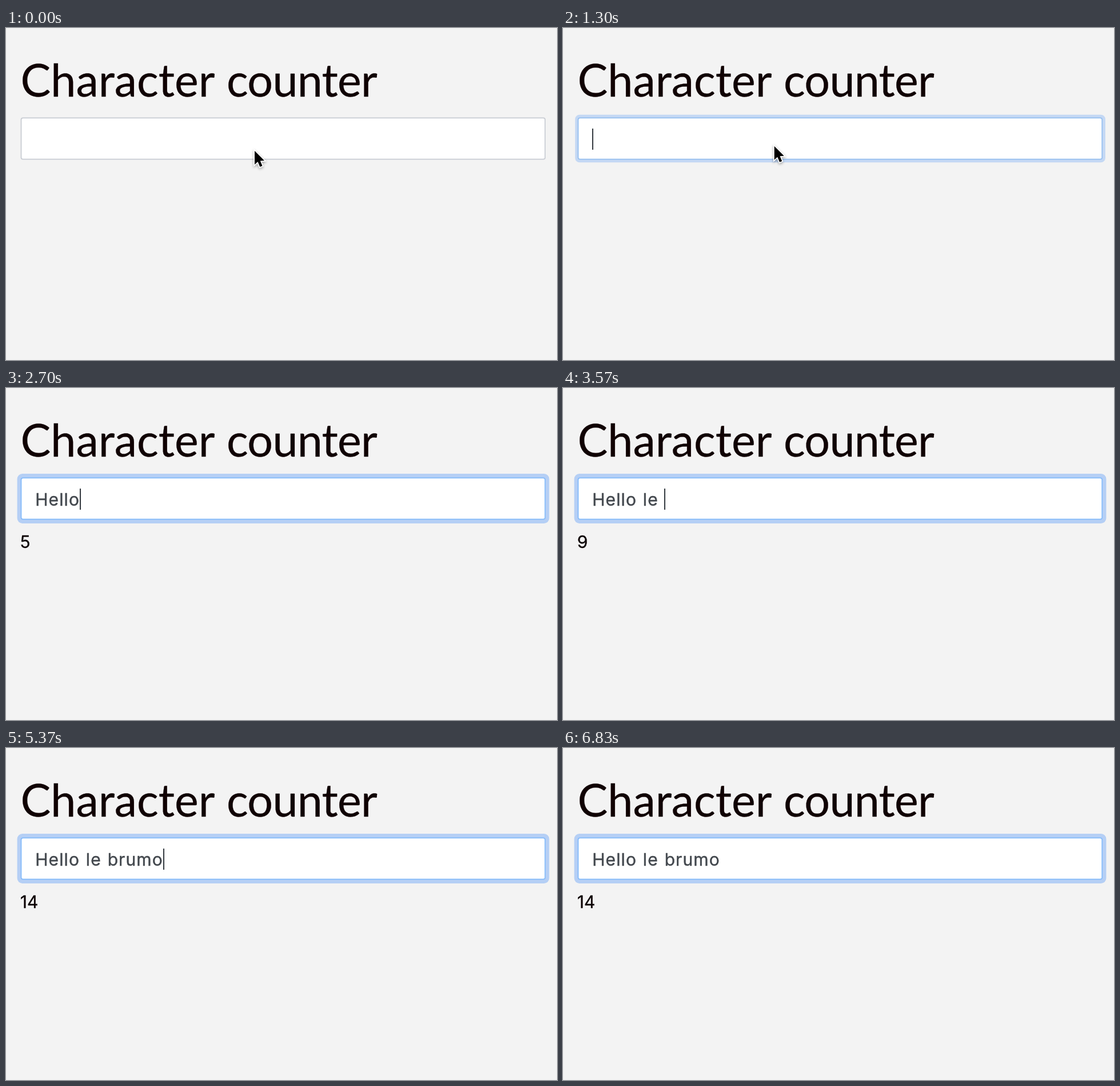
An HTML page with a canvas for the animation above (7.01 s loop, 964 by 581 pixels).

```html
<!DOCTYPE html>
<html lang="en">
<head>
<meta charset="utf-8">
<title>Character counter</title>
<style>
  html, body { margin: 0; width: 100%; height: 100%; overflow: hidden; background: #f3f3f3; }
  canvas { display: block; }
</style>
</head>
<body>
<canvas id="stage" width="964" height="581"></canvas>
<script>
const ctx = document.getElementById('stage').getContext('2d');
const LOOP = 7010;
const PHRASE = 'Hello le brumo';
const KEYS = [2000, 2130, 2270, 2400, 2500, 3330, 3400, 3500, 3570, 3700, 3830, 3970, 4100, 4330];
const FOCUS = 1200, FADE = 150, CARET_START = 1230, BLINK = 500;
const MOVE = 850;
const BODY_FONT = '30px Inter, sans-serif';
const ARROW = [[0, 0], [0, 24], [5.5, 19], [9.3, 28], [13.5, 26.2], [9.8, 17.5], [17, 17]];

const clamp = v => Math.min(1, Math.max(0, v));
const smooth = p => p * p * (3 - 2 * p);
const mix = (a, b, k) => a + (b - a) * k;
const mixColor = (a, b, k) => `rgb(${a.map((v, i) => Math.round(mix(v, b[i], k)))})`;

function setText(font, letter = 0, word = 0) {
  ctx.font = font;
  ctx.letterSpacing = letter + 'px';
  ctx.wordSpacing = word + 'px';
}

// a thin round outline softens the letter ends and adds a little weight
function inkText(text, x, y, color, outline) {
  ctx.fillStyle = ctx.strokeStyle = color;
  ctx.lineWidth = outline;
  ctx.lineJoin = 'round';
  ctx.fillText(text, x, y);
  ctx.strokeText(text, x, y);
}

function fillRound(x, y, w, h, r, color) {
  ctx.fillStyle = color;
  ctx.beginPath();
  ctx.roundRect(x, y, w, h, r);
  ctx.fill();
}

function drawTitle() {
  const word = (text, x, letter) => {
    setText('79px Lato, sans-serif', letter);
    inkText(text, x, 120, '#100203', 0.3);
  };
  word('Character', 25.6, 0);
  word('counter', 386, -0.7);
}

function drawField(focus) {
  if (focus > 0) {
    const s = 6.4 * focus;
    ctx.globalAlpha = focus;
    fillRound(26 - s, 156.5 - s, 918 + 2 * s, 74 + 2 * s, 4 + s * 0.8, '#b5cff5');
    ctx.globalAlpha = 1;
  }
  fillRound(25.6, 156.5, 918.4, 74, 4, mixColor([200, 204, 211], [133, 187, 250], focus));
  fillRound(27.4, 158.2, 914.9, 70.6, 2.5, '#fff');
}

function drawInput(t) {
  const count = KEYS.filter(k => t >= k).length;
  const text = PHRASE.slice(0, count);
  setText(BODY_FONT, 1.1, 1.3);
  inkText(text, 51.2, 206, '#43484e', 0.5);

  // each keystroke after a pause restarts the blink
  const since = t - (count > 1 ? KEYS[count - 1] : CARET_START);
  if (since >= 0 && Math.floor(since / BLINK) % 2 === 0) {
    ctx.fillStyle = '#343a40';
    ctx.fillRect(Math.round(51 + ctx.measureText(text).width), 176, 2, 37);
  }

  if (count) {
    setText(BODY_FONT);
    inkText(String(count), 24.7, 280, '#0b0203', 0.3);
  }
}

function drawPointer(t) {
  if (t >= KEYS[0]) return;
  const left = tau => Math.exp(-Math.max(0, t - MOVE) / tau);
  ctx.save();
  ctx.translate(mix(369.6, 435, left(69)), mix(206.5, 215, left(120)));
  ctx.beginPath();
  ARROW.forEach(([x, y]) => ctx.lineTo(x, y));
  ctx.closePath();
  ctx.lineJoin = 'miter';
  ctx.lineWidth = 3.4;
  ctx.strokeStyle = '#fff';
  ctx.shadowColor = 'rgba(0,0,0,0.35)';
  ctx.shadowBlur = 4;
  ctx.shadowOffsetY = 2;
  ctx.stroke();
  ctx.shadowColor = 'transparent';
  ctx.fillStyle = '#000';
  ctx.fill();
  ctx.restore();
}

function draw(t) {
  ctx.fillStyle = '#f3f3f3';
  ctx.fillRect(0, 0, 964, 581);
  drawTitle();
  drawField(smooth(clamp((t - FOCUS) / FADE)));
  drawInput(t);
  drawPointer(t);
}

const start = performance.now();
function tick() {
  draw((performance.now() - start) % LOOP);
  requestAnimationFrame(tick);
}
tick();
</script>
</body>
</html>
```
